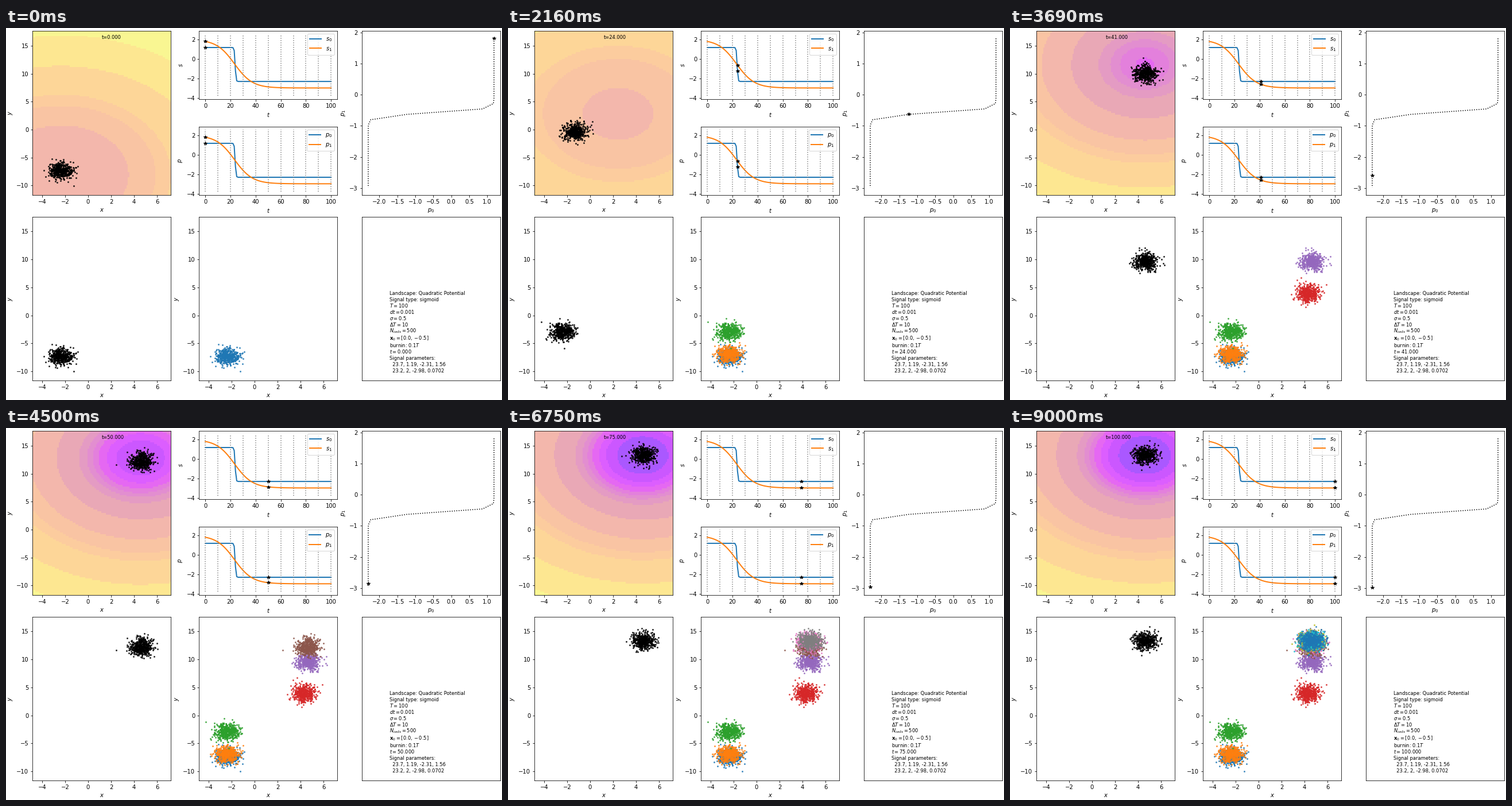
These frames come from a looping animation (864x648 px, 9090 ms). A matplotlib script:

```python
import numpy as np
import matplotlib as mpl
import matplotlib.pyplot as plt
from matplotlib.animation import FuncAnimation

W, H, DPI = 864, 648, 72
T, GAP, N_CELLS, SIGMA, BURN = 100, 10, 500, 0.5, 10
XLIM, YLIM = (-4.83, 7.2), (-11.66, 17.64)
GRID = 100
SMALL = 8.33

# Panel grid in pixels, measured from the top left.
COLS, ROWS = (46.2, 336.2, 620.0), (5.1, 328.7)
WIDTH, TALL, SHORT = 241.0, 285.5, 118.6

plt.rcParams.update({"font.family": "DejaVu Sans", "font.size": 10})


def sigmoid(t, tc, a, b, r):
    return a + (b - a) / 2 * (1 + np.tanh(r * (t - tc)))


def signal(t):
    return np.array([sigmoid(t, 23.74, 1.19, -2.31, 1.56),
                     sigmoid(t, 23.2, 2, -2.98, 0.0702)])


def simulate(sub=20):
    """Cells drifting down V = x^2/4 + y^2/9 + p0 x + p1 y with noise."""
    rng = np.random.default_rng(7)
    stiff = np.array([[1 / 2], [2 / 9]])
    dt = 1 / sub
    cells = np.tile([[0.0], [-0.5]], (1, N_CELLS))
    states = []
    for step in range(-BURN * sub, T * sub + 1):
        if step >= 0 and step % sub == 0:
            states.append(cells)
        p = signal(max(step, 0) * dt)[:, None]
        noise = SIGMA * np.sqrt(dt) * rng.standard_normal(cells.shape)
        cells = cells - (stiff * cells + p) * dt + noise
    return states


# Potential bands: vivid violets in the well, half-transparent plasma above.
LEVELS = [-24, -22.7, -21.6, -20.4, -19.4, -18.3, -16.5,
          -10.2, 0, 8.5, 14.4, 34, 61.5]
VIVID = ["#aa58ff", "#cb57ff", "#dc5eff", "#e568f2", "#e380dc", "#e28ed0",
         "#e49bc3"]
SHADES = [0.54, 0.64, 0.72, 0.763, 0.82, 0.905, 0.975]
plasma = mpl.colormaps["plasma"]
BANDS = np.array([mpl.colors.to_rgb(c) for c in VIVID]
                 + [tuple(0.5 + 0.5 * np.array(plasma(s)[:3])) for s in SHADES])
GX, GY = np.meshgrid(np.linspace(*XLIM, GRID), np.linspace(*YLIM, GRID))


def landscape(p):
    v = GX**2 / 4 + GY**2 / 9 + p[0] * GX + p[1] * GY
    return BANDS[np.digitize(v, LEVELS)]


INFO = [
    "Landscape: Quadratic Potential",
    "Signal type: sigmoid",
    "$T=100$",
    "$dt=0.001$",
    r"$\sigma=0.5$",
    r"$\Delta T=10$",
    "$N_{cells}=500$",
    r"$\mathbf{x}_0=[0.0, -0.5]$",
    "burnin: $0.1T$",
    "$t=0.000$",
    "Signal parameters:",
    "  23.7, 1.19, -2.31, 1.56",
    "  23.2, 2, -2.98, 0.0702",
]

fig = plt.figure(figsize=(W / DPI, H / DPI), dpi=DPI, facecolor="white")


def panel(left, top, height=TALL):
    return fig.add_axes([left / W, 1 - (top + height) / H, WIDTH / W, height / H])


def cell_panel(left, top):
    ax = panel(left, top)
    ax.set(xlim=XLIM, ylim=YLIM, xlabel="$x$", ylabel="$y$",
           xticks=range(-4, 7, 2), yticks=range(-10, 16, 5))
    return ax


def dots(ax, color):
    return ax.plot([], [], "o", ms=3, mew=0, color=color, alpha=0.8)[0]


def star(ax):
    return ax.plot([], [], "k*", zorder=4)[0]


def signal_panel(top, name):
    ax = panel(COLS[1], top, SHORT)
    for i in range(2):
        ax.plot(times, path[i], lw=2, label=f"${name}_{i}$")
    ax.vlines(range(0, T + 1, GAP), -3.8, 2.58, colors="grey", linestyles=":")
    ax.set(xlim=(-5, 105), ylim=(-4.12, 2.9), xlabel="$t$", ylabel=f"${name}$",
           xticks=range(0, 101, 20), yticks=range(-4, 3, 2))
    ax.legend(loc="upper right")
    return star(ax)


def info_panel():
    """Write the notes and return the line that shows the time."""
    panel(COLS[2], ROWS[1]).set(xticks=[], yticks=[])
    lines, y = [], 465
    for i, text in enumerate(INFO):
        lines.append(fig.text(668.2 / W, 1 - y / H, text, fontsize=SMALL))
        # the bold vector line is a little taller
        y += 12.5 if "mathbf" in "".join(INFO[i:i + 2]) else 11
    return lines[INFO.index("$t=0.000$")]


times = np.arange(T + 1)
path = signal(times)
states = simulate()

ax_land = cell_panel(COLS[0], ROWS[0])
field = ax_land.imshow(landscape(path[:, 0]), extent=(*XLIM, *YLIM),
                       origin="lower", aspect="auto", interpolation="nearest")
live = dots(ax_land, "k")
clock = ax_land.text(0.5, 0.95, "", transform=ax_land.transAxes, fontsize=SMALL)

time_stars = [signal_panel(ROWS[0], "s"),
              signal_panel(ROWS[0] + TALL - SHORT, "p")]

ax_path = panel(COLS[2], ROWS[0])
ax_path.plot(*path, "k:")
ax_path.set(xlim=(-2.485, 1.365), ylim=(-3.22, 2.056),
            xlabel="$p_0$", ylabel="$p_1$",
            xticks=np.arange(-2, 1.1, 0.5), yticks=range(-3, 3))
path_star = star(ax_path)

last_seen = dots(cell_panel(COLS[0], ROWS[1]), "k")

ax_all = cell_panel(COLS[1], ROWS[1])
snapshots = []
for k in range(T // GAP + 1):
    snap = dots(ax_all, f"C{k % 10}")
    snap.set_data(*states[k * GAP])
    snapshots.append(snap)

time_note = info_panel()


def update(t):
    p = path[:, t]
    field.set_data(landscape(p))
    live.set_data(*states[t])
    clock.set_text(f"t={t:.3f}")
    for s in time_stars:
        s.set_data([t, t], p)
    path_star.set_data([p[0]], [p[1]])
    last_seen.set_data(*states[t - t % GAP])
    for k, snap in enumerate(snapshots):
        snap.set_visible(k * GAP <= t)
    time_note.set_text(f"$t={t:.3f}$")
    return []


anim = FuncAnimation(fig, update, frames=T + 1, interval=90, repeat=True,
                     repeat_delay=0)
plt.show()
```
